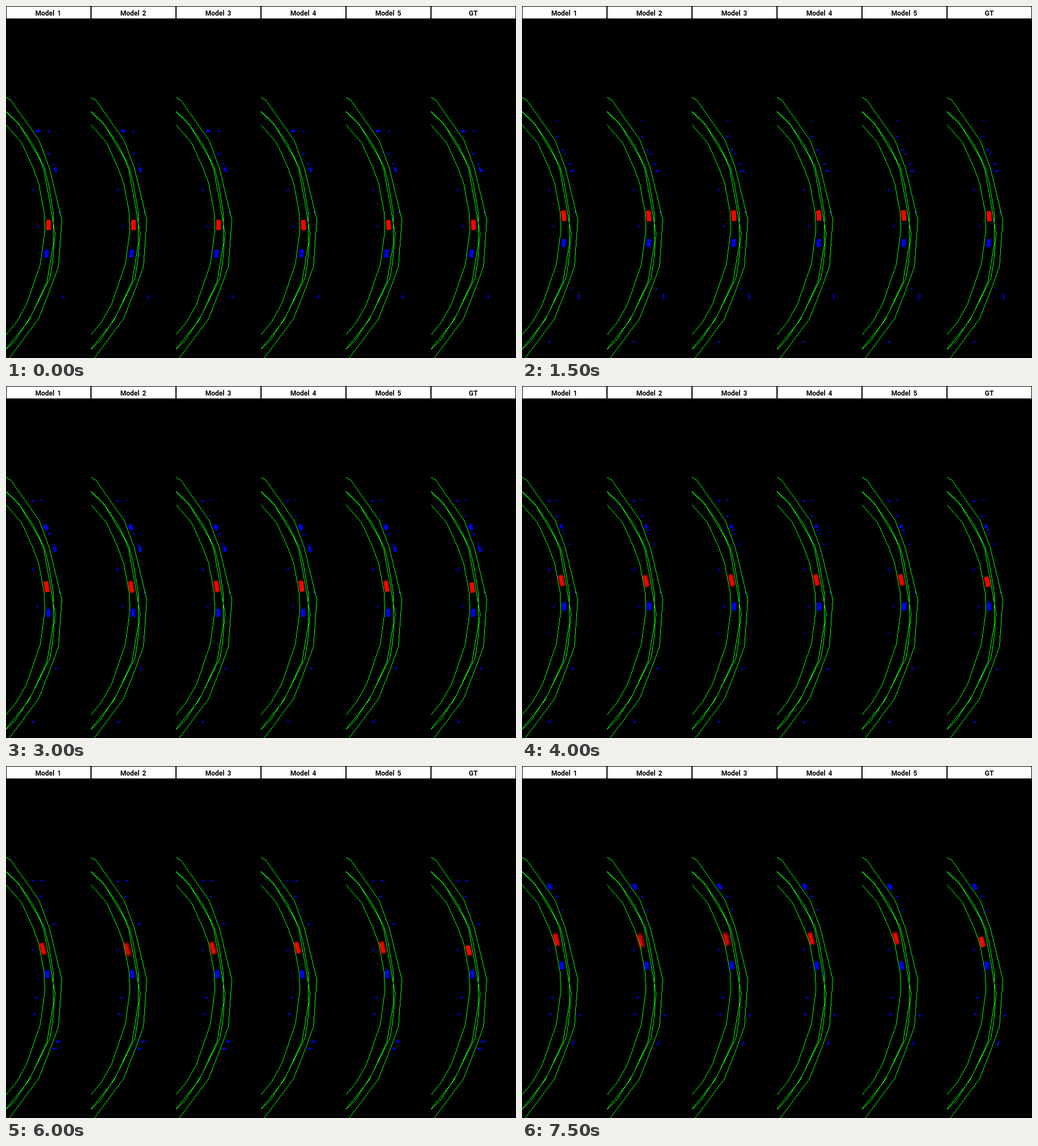
An HTML page with a canvas that plays this animation: 900 by 622 pixels, repeating every 8000 ms.

```html
<!DOCTYPE html>
<html lang="en">
<head>
<meta charset="utf-8">
<title>Trajectory model comparison</title>
<style>
html, body { margin: 0; width: 100%; height: 100%; overflow: hidden; background: #000; }
canvas { display: block; }
</style>
</head>
<body>
<canvas id="stage" width="900" height="622"></canvas>
<script>
const ctx = document.getElementById('stage').getContext('2d');
const PANEL = 150, STEP = 500, STEPS = 16;

const lanes = [
  [[0,161],[8,166],[58,237],[76,286],[98,377],[92,460],[79,496],[57,552],[5,622]],
  [[0,210],[27,241],[46,283],[57,312],[67,365],[68,398],[60,456],[36,526],[18,558],[0,580]],
  [[0,187],[24,211],[58,268],[66,288],[76,342],[86,401],[82,450],[77,480],[40,555],[0,605]],
  [[0,186],[21,206],[48,246],[67,285],[74,312],[83,365],[83,420],[72,486],[45,545],[16,590],[0,606]]
];

// Offset from the true path at the end, blur at the end, first tilt.
const models = [
  { name: 'Model 1', dx: -1.5, dy: -4, blur: 1.5, tilt: 0 },
  { name: 'Model 2', dx: -2.7, dy: -2.5, blur: 2.7, tilt: 0 },
  { name: 'Model 3', dx: -1.5, dy: -5, blur: 2, tilt: 0 },
  { name: 'Model 4', dx: -2, dy: -6, blur: 1.6, tilt: -3 },
  { name: 'Model 5', dx: -2, dy: -6.5, blur: 1.6, tilt: -5 },
  { name: 'GT', dx: 0, dy: 0, blur: 0, tilt: -2 }
];

// Flickering detections: x, y, first and last phase.
const specks = [
  [62,202,1,5], [61,230,1,6], [71,254,1,6], [75,261,0,4], [83,279,0,5],
  [47,203,2,5], [88,499,1,4], [47,593,1,4], [49,438,3,6], [53,409,5,6]
];

// Larger detections: phase, x, y, width, height, angle.
const blocks = [
  [0,56,221,7,4,0], [0,75,221,3,3,0], [0,87,289,4,9,-30], [0,101,514,2,7,15],
  [1,100,513,2,11,0], [1,88,291,6,3,0],
  [2,70,249,7,9,-25], [2,86,288,5,10,-15],
  [3,69,248,5,6,20], [5,92,487,8,3,-10], [5,85,499,6,3,0],
  [6,49,213,6,11,-30], [6,101,440,3,5,0], [6,90,490,2,10,30]
];

// Repeatable value from 0 to 1.
function noise(n) {
  const v = Math.sin(n * 12.9898) * 43758.5453;
  return v - Math.floor(v);
}

function box(x, y, w, h, angle = 0) {
  if (!angle) {
    ctx.fillRect(Math.round(x - w / 2), Math.round(y - h / 2), w, h);
    return;
  }
  ctx.save();
  ctx.translate(x, y);
  ctx.rotate(angle * Math.PI / 180);
  ctx.fillRect(-w / 2, -h / 2, w, h);
  ctx.restore();
}

// Hard-edged one pixel line.
function line([x0, y0], [x1, y1]) {
  const n = Math.max(Math.abs(x1 - x0), Math.abs(y1 - y0));
  for (let i = 0; i <= n; i++) {
    ctx.fillRect(Math.round(x0 + (x1 - x0) * i / n), Math.round(y0 + (y1 - y0) * i / n), 1, 1);
  }
}

function drawDetections(s) {
  const phase = Math.round(s * .4 + .02);
  ctx.fillStyle = '#00f';
  specks.forEach(([x, y, from, to], i) => {
    if (phase < from || phase > to) return;
    const r = noise(s * 17 + i);
    box(x + Math.round(r * 2 - 1), y, r > .5 ? 4 : 3, r > .3 ? 3 : 2);
  });
  for (const [p, ...shape] of blocks) if (p === phase) box(...shape);
  box(47.5, 324.5, 1.8, 6, 30);
  if (phase < 5) box(56, 389.5, 1.8, 5, 35);
  box(104, 386, 1, 2);

  // Following car
  box(74.5 - .0656 * (s - 7) ** 2, 437.5 - 6.38 * s + .0476 * s * s, 7, 14, 8 - s * .95);
}

function drawCar({ dx, dy, blur, tilt }, s) {
  const x = 75 - .081 * s - .0524 * s * s + dx * Math.min(1, s / 10);
  const y = 387 - 5.19 * s + .0083 * s * s + dy * s / 15;
  const soft = blur * s / 15;
  ctx.fillStyle = '#f00';
  if (soft) ctx.filter = `blur(${soft}px)`;
  box(x, y, 8, 18 + soft * 2, tilt * Math.max(0, 1 - s / 3) - Math.min(14, s * 1.5));
  ctx.filter = 'none';
}

function drawTitle(name) {
  ctx.fillStyle = '#fff';
  ctx.fillRect(1, 1, 148, 21);
  ctx.fillStyle = '#000';
  ctx.font = '700 12px Roboto, sans-serif';
  ctx.wordSpacing = '2px';
  ctx.textAlign = 'center';
  ctx.fillText(name, 74.5, 17);
}

function drawPanel(model, column, s) {
  ctx.save();
  ctx.translate(column * PANEL, 0);
  ctx.beginPath();
  ctx.rect(0, 0, PANEL, 622);
  ctx.clip();
  drawDetections(s);
  drawCar(model, s);
  ctx.fillStyle = '#0f0';
  for (const lane of lanes) lane.slice(1).forEach((point, i) => line(lane[i], point));
  if (s < 9) {
    ctx.fillStyle = '#04f';
    box(94, 364, 2, 3);
  }
  drawTitle(model.name);
  ctx.restore();
}

function frame() {
  const s = Math.floor(performance.now() / STEP) % STEPS;
  ctx.fillStyle = '#000';
  ctx.fillRect(0, 0, 900, 622);
  models.forEach((model, i) => drawPanel(model, i, s));
  requestAnimationFrame(frame);
}
frame();
</script>
</body>
</html>
```
